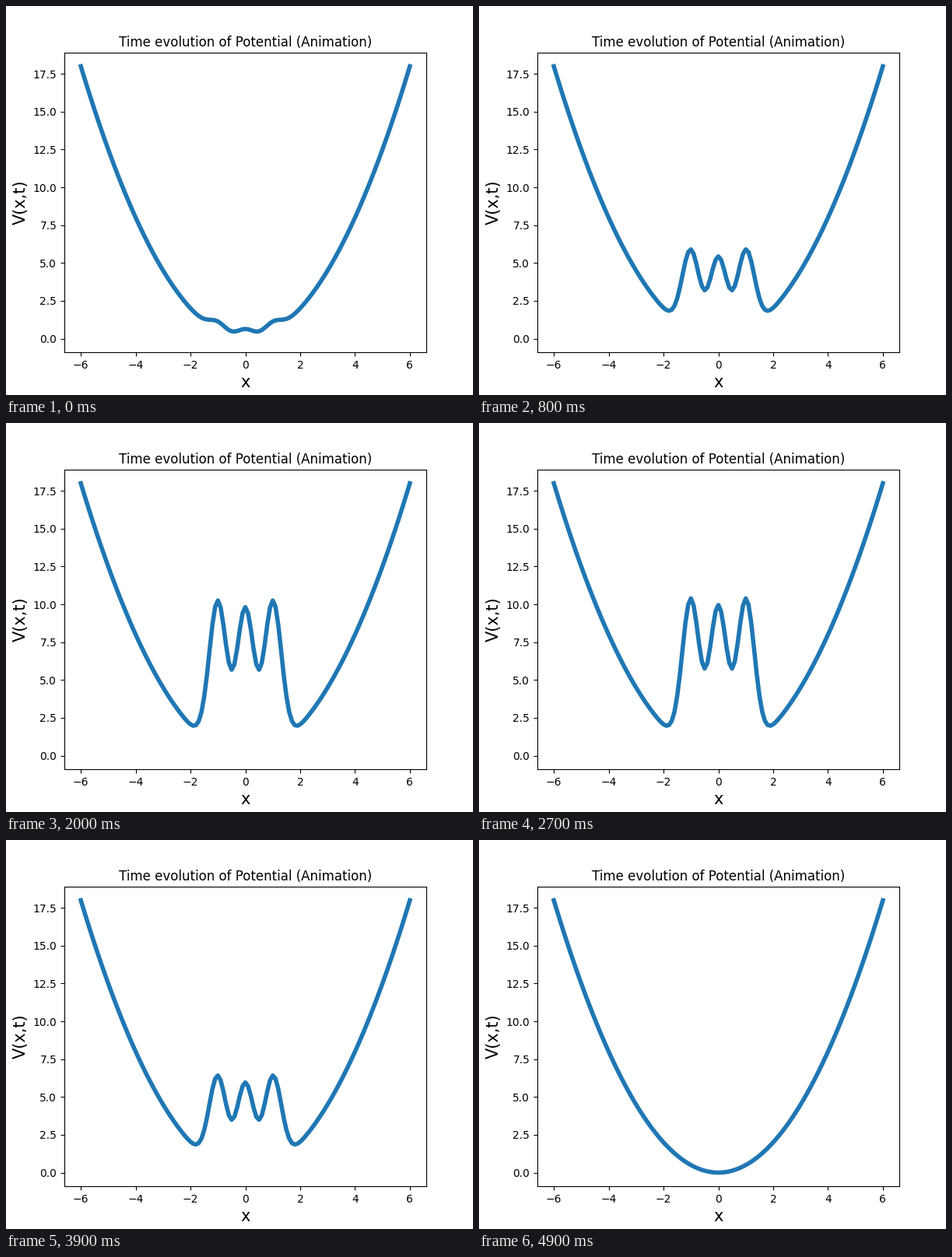
A matplotlib script for the animation above (5000 ms loop, 600 by 500 pixels).

```python
import matplotlib.pyplot as plt
import numpy as np
from matplotlib.animation import FuncAnimation

FRAMES = 50
INTERVAL = 100  # ms
BARRIER_HEIGHT = 10
BARRIER_CENTERS = (-1, 0, 1)

x = np.linspace(-6, 6, 121)
well = x**2 / 2
barriers = sum(np.exp(-5 * (x - c) ** 2) for c in BARRIER_CENTERS)


def potential(frame):
    """Harmonic well with three barriers that rise and fall over half a sine."""
    phase = np.pi * (frame + 1) / FRAMES
    return well + BARRIER_HEIGHT * np.sin(phase) * barriers


fig, ax = plt.subplots(figsize=(6, 5), dpi=100)
line, = ax.plot(x, potential(0), color="tab:blue", linewidth=4)
ax.set_xlim(-6.6, 6.6)
ax.set_ylim(-0.9, 18.9)
ax.set_title("Time evolution of Potential (Animation)")
ax.set_xlabel("x", fontsize=15)
ax.set_ylabel("V(x,t)", fontsize=15)


def update(frame):
    line.set_ydata(potential(frame))
    return line,


anim = FuncAnimation(fig, update, frames=FRAMES, interval=INTERVAL,
                     repeat=True, repeat_delay=0)
plt.show()
```
